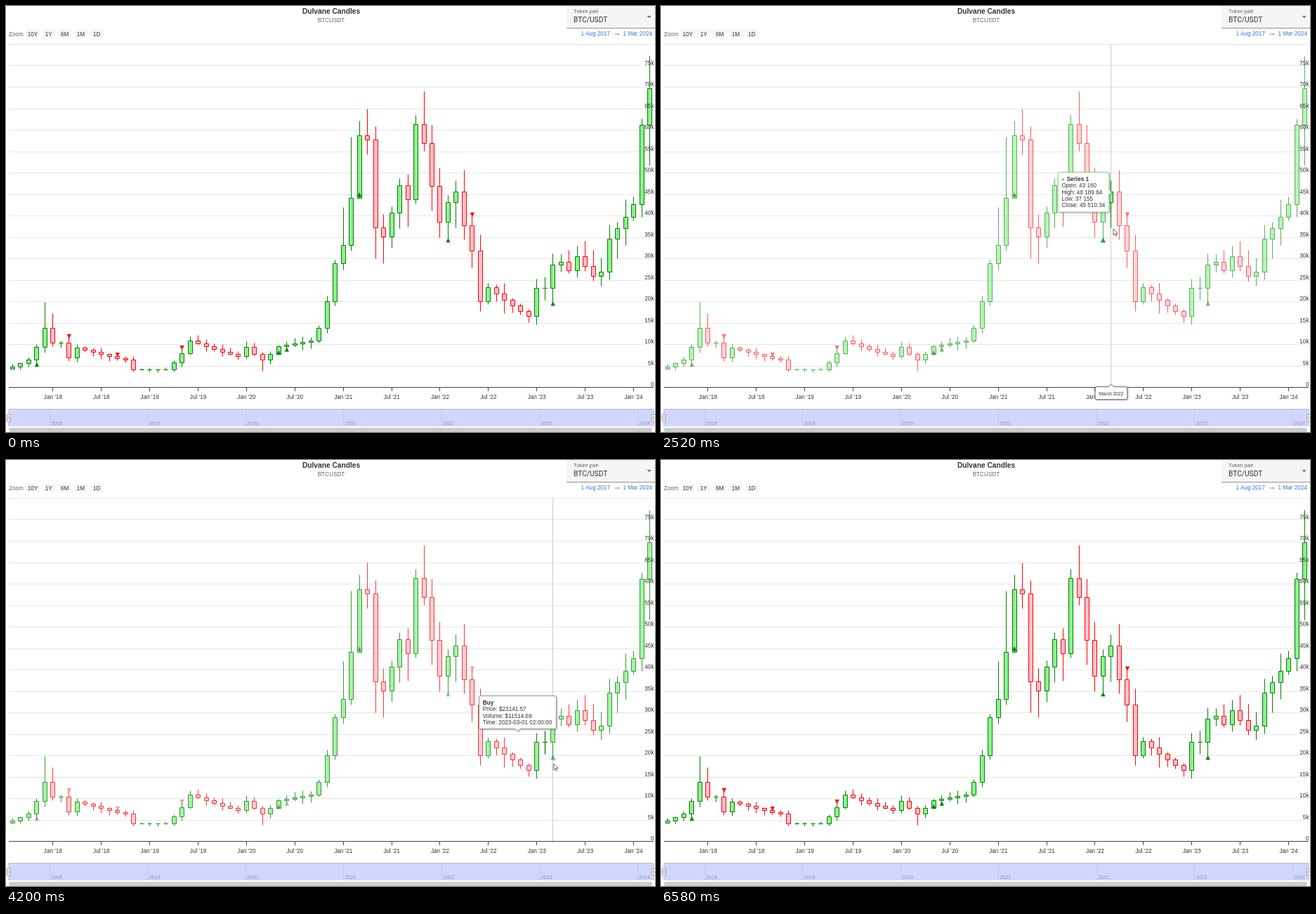
Animation of 924 by 606 pixels, one loop 6.73 s. Source, as an HTML page:

```html
<!DOCTYPE html>
<html lang="en">
<head>
<meta charset="utf-8">
<title>Candles</title>
<style>
html, body { margin: 0; width: 100%; height: 100%; overflow: hidden; background: #fff; }
svg { display: block; width: 100vw; height: 100vh; }
text { font: 8.2px "Liberation Sans", Arial, sans-serif; fill: #333; white-space: pre; }
.title { font-size: 10.2px; font-weight: bold; }
.muted { fill: #666; }
.small { font-size: 6.6px; }
.year { font-size: 7.2px; fill: #9296b4; }
.range { fill: #3474dc; }
.field { font: 10.2px Roboto, sans-serif; }
.caption { font: 7.7px Roboto, sans-serif; }
.bold { font-weight: bold; }
.mid { text-anchor: middle; }
.end { text-anchor: end; }
.up { fill: #90ee90; stroke: #008000; }
.down { fill: #ffc0cb; stroke: #f00; }
.hot { stroke-width: 1.5; }
.buy { fill: #008000; }
.sell { fill: #f00; }
.balloon { fill: #fff; stroke-width: .9; filter: drop-shadow(1px 1px 1px rgba(0,0,0,.3)); }
</style>
</head>
<body>
<svg viewBox="0 0 924 606" xmlns="http://www.w3.org/2000/svg">
  <g id="grid" stroke="#e6e6e6"></g>
  <g id="hairs" stroke="#ccc"></g>
  <g id="candles"></g>
  <g id="hot"></g>
  <g id="marks"></g>
  <g id="halos"></g>
  <g id="axes"></g>
  <g id="header">
    <rect x="798" width="126" height="32" fill="#f5f5f5"/>
    <path d="M798 31.5H924" stroke="#949494"/>
    <path d="M912.5 14h6.4l-3.2 3.2z" fill="#757575"/>
    <path d="M866 40h7m-2-1.6 2 1.6-2 1.6" fill="none" stroke="#777" stroke-width=".7"/>
  </g>
  <g id="navigator">
    <rect x="4" y="573.5" width="918" height="24.5" fill="#d1d6ff"/>
    <path d="M4 598V573.5H922V598" fill="none" stroke="#adb0cc" stroke-width=".8"/>
    <rect x="4" y="600" width="916" height="6" rx="3" fill="#ccc"/>
  </g>
  <g id="months"></g>
  <g id="tip"></g>
  <path id="cursor" d="M0 0V9L2.1 7.1 3.5 10.2 4.9 9.6 3.5 6.6H6.4Z" fill="#fff" stroke="#222" stroke-width=".7"/>
</svg>
<script>
const LOOP = 6730, COUNT = 80;
const $ = id => document.getElementById(id);
const sheet = document.head.appendChild(document.createElement('style')).sheet;

// Closing price at the months where the trend turns; geometric growth between them.
const turns = {
  0: 4725, 2: 6463, 4: 13716, 5: 10285, 6: 10327, 7: 6924, 8: 9246, 14: 6372, 15: 4041, 19: 4104,
  22: 10854, 28: 7195, 29: 9353, 31: 6410, 33: 9448, 37: 10777, 38: 13791, 40: 28924, 41: 33093,
  43: 58741, 44: 57694, 45: 37254, 46: 35045, 48: 47101, 49: 43824, 50: 61300, 51: 56951,
  53: 38466.9, 54: 43160, 55: 45510.34, 56: 37630.8, 57: 31801, 58: 19942, 59: 23293, 64: 16542,
  65: 23125, 66: 23141.57, 67: 28465.36, 68: 29233.21, 69: 27210, 70: 30472, 72: 25941, 73: 26963,
  74: 34640, 77: 42580, 78: 61131, 79: 69700 };
const buys = { 3: 5325, 33: 8117, 34: 8833, 43: 44951, 54: 34322, 67: 19549 };
const sells = { 7: 11710, 13: 7410, 21: 9074, 57: 40071 };
// The longest wicks; the rest are seeded random.
const peaks = { ...sells, 4: 19800, 5: 17200, 41: 41950, 42: 58350, 44: 64850, 51: 69000, 55: 48189.84, 68: 31000 };
const troughs = { ...buys, 31: 3780, 45: 30000, 46: 28800, 55: 37155, 68: 26942.82 };

const turnMonths = Object.keys(turns).map(Number);
function close(i) {
  if (i < 0) return 4261;
  if (i in turns) return turns[i];
  const b = turnMonths.find(m => m > i), a = turnMonths[turnMonths.indexOf(b) - 1];
  return turns[a] * (turns[b] / turns[a]) ** ((i - a) / (b - a));
}
const open = i => close(i - 1);
const isUp = i => close(i) >= open(i);
const random = seed => Math.abs(Math.sin(seed * 12.9898) * 43758.5453) % 1;
const high = i => peaks[i] ?? Math.max(open(i), close(i)) * (1.02 + .12 * random(i + 1));
const low = i => troughs[i] ?? Math.min(open(i), close(i)) * (.98 - .14 * random(i + 101));

const snap = v => Math.floor(v) + .5;
const X = i => 9.5 + i * 907 / 79;
const Y = price => 542.5 - price * .0061;
const dateOf = i => new Date(Date.UTC(2017, 7 + i, 1));

function add(parent, tag, attrs = {}, content = '') {
  const el = document.createElementNS('http://www.w3.org/2000/svg', tag);
  for (const key in attrs) el.setAttribute(key, attrs[key]);
  el.textContent = content;
  return parent.appendChild(el);
}
const label = (parent, x, y, content, cls = '') => add(parent, 'text', { x, y, class: cls }, content);

// Stops are [ms, css]; the first and last are held to the ends of the loop.
let serial = 0;
function animate(el, stops, easing = 'linear') {
  const name = 'k' + serial++;
  const all = [[0, stops[0][1]], ...stops, [LOOP, stops[stops.length - 1][1]]];
  const body = all.map(([ms, css]) => `${(ms / LOOP * 100).toFixed(3)}%{${css}}`).join('');
  sheet.insertRule(`@keyframes ${name}{${body}}`, sheet.cssRules.length);
  el.style.animation = `${name} ${LOOP}ms ${easing} infinite`;
}
const show = (el, from, to) => animate(el,
  [[0, 'visibility:hidden'], [from, 'visibility:visible'], [to, 'visibility:hidden']], 'step-end');
const fade = (el, stops) => animate(el, stops.map(([ms, o]) => [ms, `opacity:${o}`]));
const follow = (el, points, extra = []) => animate(el,
  [...points.map(([ms, x, y]) => [ms, `transform:translate(${x}px,${y}px)`]), ...extra]);

function balloon(parent, w, h, side, stroke) {
  const on = (name, part) => side === name ? part : '';
  add(parent, 'path', { class: 'balloon', stroke, d:
    'M2 0' + on('top', `H${w / 2 - 3.5}l3.5-3.5 3.5 3.5`) + `H${w - 2}q2 0 2 2` +
    on('right', `V${h / 2 - 3.5}l3.5 3.5-3.5 3.5`) + `V${h - 2}q0 2-2 2` +
    on('bottom', `H${w / 2 + 3.5}l-3.5 3.5-3.5-3.5`) + 'H2q-2 0-2-2V2q0-2 2-2Z' });
}

function candle(parent, i, cls = '') {
  const x = snap(X(i)), y = price => snap(Y(price));
  const top = y(Math.max(open(i), close(i))), bottom = y(Math.min(open(i), close(i)));
  return add(parent, 'path', { class: `${cls} ${isUp(i) ? 'up' : 'down'}`,
    d: `M${x - 3} ${top}h6V${bottom}h-6ZM${x} ${top}V${y(high(i))}M${x} ${bottom}V${y(low(i))}` });
}

const markY = i => i in buys ? Y(buys[i]) : Y(sells[i]) - 1;
function mark(parent, i, r, attrs = {}) {
  const s = i in buys ? 1 : -1;
  add(parent, 'path', { class: i in buys ? 'buy' : 'sell', ...attrs,
    d: `M${X(i) - r} ${markY(i) + s * r}h${2 * r}l${-r} ${-2 * r * s}z` });
}

// Static chart
const header = $('header');
label(header, 463, 11.3, 'Dulvane Candles', 'title mid');
label(header, 463, 23.4, 'BTCUSDT', 'muted mid');
label(header, 4, 42.6, 'Zoom', 'muted');
['10Y', '1Y', '6M', '1M', '1D'].forEach((name, n) => {
  const x = 38 + n * 22.8;
  add(header, 'rect', { x: x - 9.8, y: 33, width: 19.6, height: 13, rx: 1.2, fill: '#f7f7f7' });
  label(header, x, 42.6, name, 'mid');
});
label(header, 808, 9.5, 'Token pair', 'muted caption');
label(header, 808, 23.4, 'BTC/USDT', 'field');
label(header, 818.5, 42, '1 Aug 2017', 'range');
label(header, 920, 42, '1 Mar 2024', 'range end');

const axes = $('axes');
for (let k = 0; k <= 80; k += 5) {
  const y = Y(k * 1000);
  if (k) add($('grid'), 'path', { d: `M4 ${snap(y)}H922` });
  if (k < 80) label(axes, 922.5, y - 1.5, k ? k + 'k' : '0', 'end');
}
add(axes, 'path', { d: 'M4 542.5H922', stroke: '#444' });
for (let i = 5; i < COUNT; i += 6) {
  const d = dateOf(i);
  add(axes, 'path', { d: `M${snap(X(i))} 542.5v5.5`, stroke: '#444' });
  label(axes, X(i), 558.8, `${d.getUTCMonth() ? 'Jul' : 'Jan'} '${d.getUTCFullYear() % 100}`, 'mid');
}
for (let i = 0; i < COUNT; i++) candle($('candles'), i);
for (const i in { ...buys, ...sells }) mark($('marks'), +i, 3.2);

const strip = $('navigator');
for (let n = 0; n < 7; n++) {
  const x = 62 + n * 139.5;
  add(strip, 'path', { d: `M${snap(x)} 574V598`, stroke: '#c3c8ea' });
  label(strip, x + 2, 596, 2018 + n, 'year');
}
[4, 922].forEach(x => {
  add(strip, 'rect', { x: x - 2.5, y: 581, width: 5, height: 10, fill: '#f2f2f2', stroke: '#999', 'stroke-width': .8 });
  add(strip, 'path', { d: `M${x - .8} 583.5v5m1.6-5v5`, stroke: '#999', 'stroke-width': .6 });
});

// Hovering
function tipLines(group, lines, indent) {
  lines.forEach((line, n) =>
    label(group, n ? 5.3 : 5.3 + indent, 12.4 + n * 9.3, line, n ? '' : 'bold'));
}
const money = v => v.toLocaleString('en-US', { maximumFractionDigits: 2 }).replace(/,/g, ' ');
const hair = (i, from, to) => show(add($('hairs'), 'path', { d: `M${snap(X(i))} 54V542` }), from, to);

function hoverCandle(i, from, to, tipEnd = to) {
  const color = isUp(i) ? '#74cc74' : '#f5a3b1';
  const tip = add($('tip'), 'g');
  balloon(tip, 72.8, 56.5, 'right', color);
  add(tip, 'circle', { cx: 7, cy: 10, r: 1.7, fill: color });
  tipLines(tip, ['Series 1', 'Open: ' + money(open(i)), 'High: ' + money(high(i)),
    'Low: ' + money(low(i)), 'Close: ' + money(close(i))], 7.2);
  show(tip, from, tipEnd);

  const month = add($('months'), 'g');
  const name = dateOf(i).toLocaleString('en-US', { month: 'long', year: 'numeric', timeZone: 'UTC' });
  const text = label(month, 0, 12.3, name, 'small mid');
  const w = text.getComputedTextLength() + 11;
  balloon(month, w, 18, 'top', '#555');
  text.setAttribute('x', w / 2);
  month.append(text);
  month.setAttribute('transform', `translate(${X(i) - w / 2} 541.7)`);
  show(month, from, to);

  fade(candle($('hot'), i, 'hot'), [[from, 0], [to, 1], [to + 150, 0]]);
  hair(i, from, to);
}

function hoverCandles(first, last, from, to) {
  const each = (to - from) / (last - first + 1);
  for (let i = first; i <= last; i++) hoverCandle(i, from + (i - first) * each, from + (i - first + 1) * each);
}

const markHovers = [];
function hoverMark(i, volume, hour, from, to) {
  const tip = add($('tip'), 'g');
  balloon(tip, 110, 47, 'bottom', '#888');
  tipLines(tip, [i in buys ? 'Buy' : 'Sell', 'Price: $' + open(i).toFixed(2), 'Volume: $' + volume,
    `Time: ${dateOf(i).toISOString().slice(0, 10)} ${hour}:00:00`], 0);
  show(tip, from, to);
  const halo = add($('halos'), 'g');
  add(halo, 'circle', { cx: X(i), cy: markY(i), r: 6, fill: '#2caffe', opacity: .22 });
  mark(halo, i, 3.6, i in sells ? { stroke: '#300', 'stroke-width': .7 } : {});
  fade(halo, [[from, 0], [from + 150, 1], [to, 1], [to + 200, 0]]);
  hair(i, from, to);
  markHovers.push([from, to]);
}

hoverCandles(55, 56, 540, 940);
hoverMark(54, '10201.77', '02', 940, 2420);
hoverCandles(55, 56, 2420, 2740);
hoverMark(57, '5064.41', '03', 2740, 3590);
hoverCandles(57, 66, 3590, 4155);
hoverMark(67, '11514.69', '02', 4155, 5405);
hoverCandle(68, 5405, 5560);
hoverCandles(69, 72, 5560, 5840);
hoverCandle(73, 5840, 5910, 6580);

// Whichever series is not hovered fades to a fifth.
const dim = markHovers.flatMap(([from, to]) => [[from, 1], [from + 180, .2], [to, .2], [to + 180, 1]]);
fade($('candles'), dim);
fade($('marks'), [[540, 1], [720, .2], ...dim.map(([ms, o]) => [ms, 1.2 - o]), [6400, .2], [6580, 1]]);

const besideCandle = i => [X(i) - 75.8, Y(close(i)) - 28.2];
const aboveMark = i => [X(i) - 55, Y(buys[i] ?? sells[i]) - 57];
const rest = (from, to, spot) => [[from, ...spot], [to, ...spot]];

follow($('tip'), [
  [540, 646, 389], [1020, 607, 283.5], ...rest(1250, 2420, aboveMark(54)),
  ...rest(2510, 2580, besideCandle(55)), ...rest(3100, 3590, aboveMark(57)),
  [4200, 673.3, 335.4], ...rest(4500, 5405, aboveMark(67)),
  ...rest(5500, 5560, besideCandle(68)), [5980, ...besideCandle(73)],
], [[6400, 'opacity:1'], [6580, 'opacity:0']]);

follow($('cursor'), [
  [420, 720, 608], [1020, 625.8, 357.8], ...rest(1300, 2400, [630, 332]), [2520, 644, 317],
  ...rest(2900, 3560, [667, 297.5]), [4200, 779.5, 432], ...rest(4400, 5390, [782.5, 429.5]), [6180, 888, 608],
]);
</script>
</body>
</html>
```
